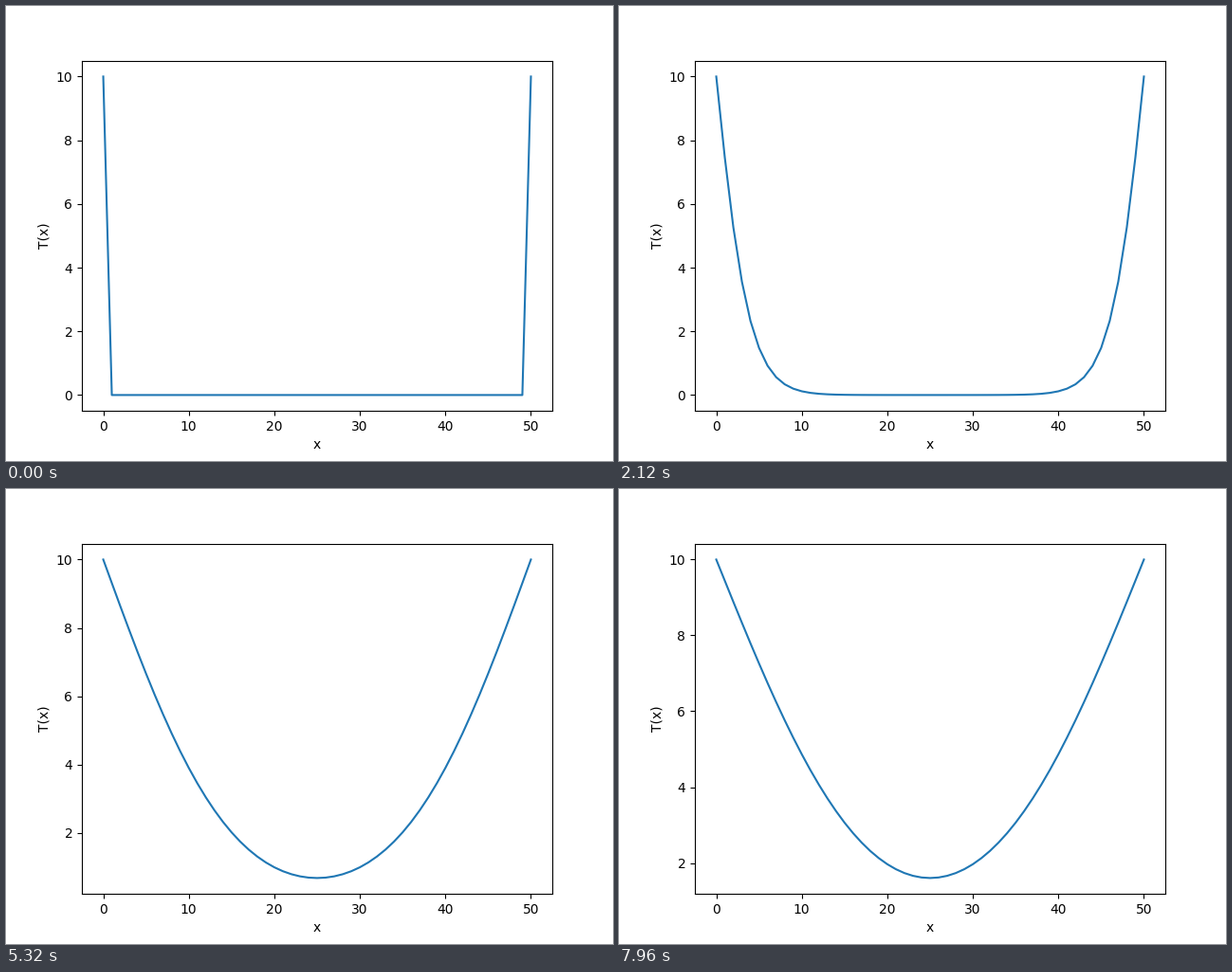
Write a matplotlib script that moves like this. It is 640 px wide and 480 px high and loops after 8 s.

```python
import numpy as np
import matplotlib.pyplot as plt
from matplotlib.animation import FuncAnimation

# Heat conduction in a rod with both ends held hot, implicit Euler steps
LENGTH = 50
POINTS = 51
T_EDGE = 10.0
STEPS = 50           # the simulation restarts after this many frames
FRAMES = 200
INTERVAL = 40        # ms

dx = LENGTH / POINTS
dt = 2.0
alpha = dt / dx ** 2


def step_matrix():
    m = np.eye(POINTS)
    for i in range(1, POINTS - 1):
        m[i, i - 1:i + 2] = -alpha, 1 + 2 * alpha, -alpha
    return m


def simulate():
    matrix = step_matrix()
    temp = np.zeros(POINTS)
    temp[[0, -1]] = T_EDGE
    states = [temp]
    for _ in range(STEPS - 1):
        states.append(np.linalg.solve(matrix, states[-1]))
    return states


x = np.arange(POINTS)
states = simulate()

fig, ax = plt.subplots(figsize=(6.4, 4.8), dpi=100)
line, = ax.plot(x, states[0])
ax.set_xlabel("x")
ax.set_ylabel("T(x)")


def update(frame):
    line.set_ydata(states[frame % STEPS])
    ax.relim()
    ax.autoscale_view()
    return line,


anim = FuncAnimation(fig, update, frames=FRAMES, interval=INTERVAL,
                     init_func=lambda: update(0), repeat=True, repeat_delay=0)
plt.show()
```
